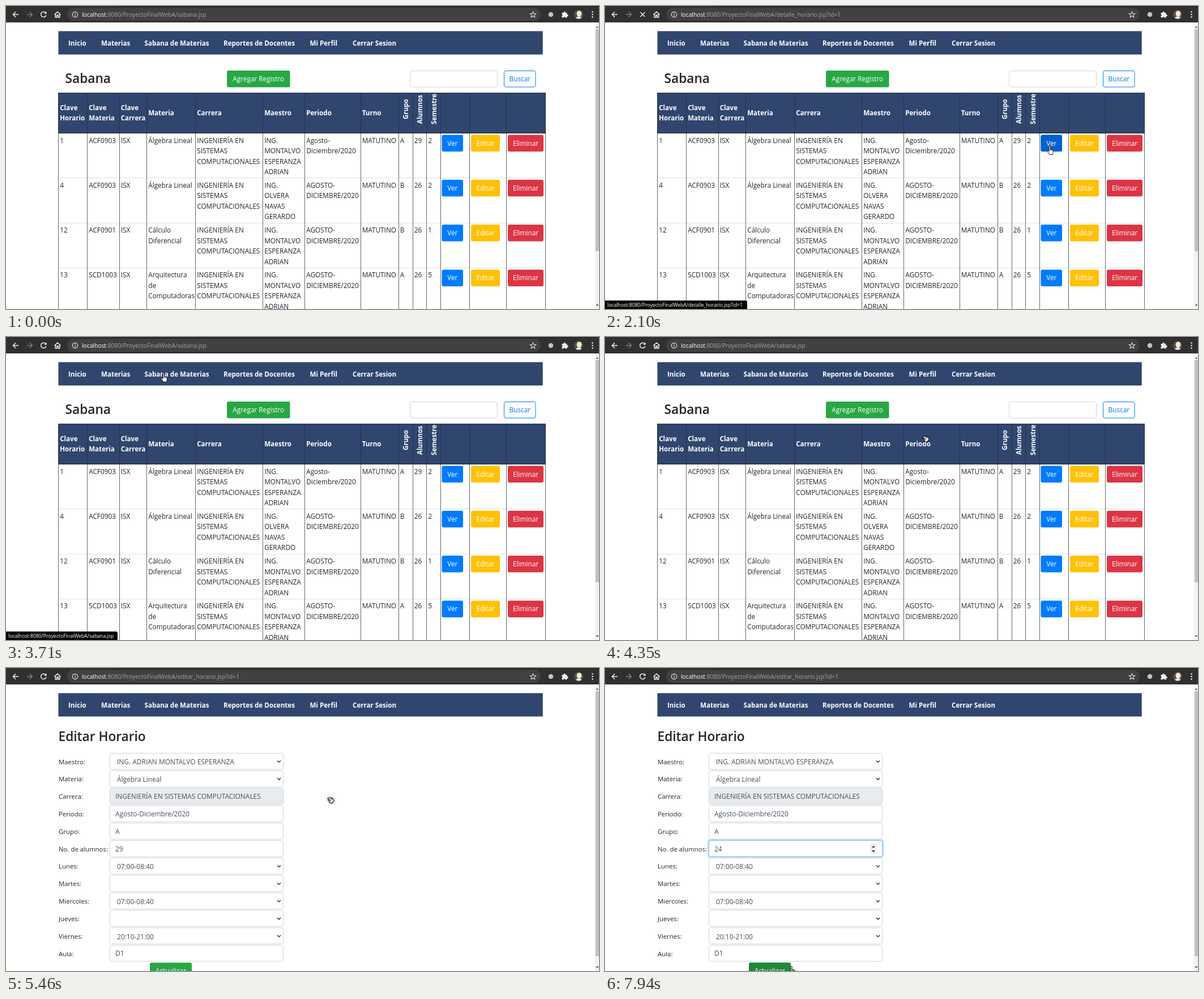
Write an HTML page that moves like this. It is 1047 px wide and 535 px high and loops after 8000 ms.

```html
<!DOCTYPE html>
<html lang="es">
<head>
<meta charset="utf-8">
<title>Sabana</title>
<style>
html, body { margin: 0; width: 100%; height: 100%; overflow: hidden; background: #fff; }
svg { display: block; width: 1047px; height: 535px; }
text { font: 11.8px "Open Sans", "Noto Sans", sans-serif; fill: #212529; white-space: pre; }
.b { font-weight: 700; font-size: 11.6px; }
.w { fill: #fff; }
.mid { text-anchor: middle; }
.h2 { font-size: 22.7px; font-weight: 600; }
.h4 { font-size: 17px; font-weight: 600; }
.label { font-size: 11.4px; }
.value { font-size: 11.95px; }
.field { font-size: 11.95px; fill: #495057; }
.url { font-size: 10.25px; fill: #a3a3a3; }
.url tspan { fill: #fff; }
.tip { font-size: 8.7px; fill: #fff; }
.ico { fill: none; stroke: #f1f1f1; stroke-width: 1.5; }
</style>
</head>
<body>
<script>
const LOOP = 8000;
const pct = t => t / LOOP * 100 + '%';
let css = '', count = 0;

// Show a group only between pairs of times
function on(body, ...times) {
  const k = 'k' + count++;
  const frames = times.map((t, i) => `${pct(t)}{opacity:${1 - i % 2}}`).join('');
  css += `@keyframes ${k}{0%{opacity:0}${frames}}.${k}{animation:${k} ${LOOP}ms step-end infinite}`;
  return `<g class="${k}">${body}</g>`;
}

function travel(body, points) {
  const k = 'k' + count++;
  const frames = points.map(([t, x, y], i) => {
    const next = points[i + 1];
    const n = next ? Math.max(1, Math.round((next[0] - t) / 76)) : 1;
    return `${pct(t)}{transform:translate(${x}px,${y}px);animation-timing-function:steps(${n},end)}`;
  }).join('');
  css += `@keyframes ${k}{${frames}}.${k}{animation:${k} ${LOOP}ms infinite}`;
  return `<g class="${k}">${body}</g>`;
}

const text = (x, y, s, cls = '') => `<text x="${x}" y="${y}" class="${cls}">${s}</text>`;
const rect = (x, y, w, h, fill, extra = '') =>
  `<rect x="${x}" y="${y}" width="${w}" height="${h}" fill="${fill}" ${extra}/>`;
const path = (d, extra = 'class="ico"') => `<path d="${d}" ${extra}/>`;
const vline = (x, y1, y2, c) => path(`M${x} ${y1}V${y2}`, `stroke="${c}"`);
const hline = (y, x1, x2, c) => path(`M${x1} ${y}H${x2}`, `stroke="${c}"`);
const button = (x, y, w, label, fill) =>
  rect(x, y, w, 29.5, fill, 'rx="3"') + text(x + w / 2, y + 19, label, 'w mid');
const box = (x, y, w, fill = '#fff') => rect(x, y, w, 28.5, fill, 'rx="3" stroke="#ced4da"');

function nav(x) {
  const items = [[17.5, 'Inicio'], [75.5, 'Materias'], [152, 'Sabana de Materias'],
    [291.5, 'Reportes de Docentes'], [444, 'Mi Perfil'], [519.5, 'Cerrar Sesion']];
  return rect(x, 44.4, 855.2, 41.2, '#30466f') +
    items.map(([dx, s]) => text(x + dx, 70, s, 'b w')).join('');
}

function scrollbar(end) {
  return rect(1040, 29, 7, 506, '#f1f1f1') + rect(1041, 41, 6, end - 41, '#c1c1c1') +
    path('M1041.5 38.5l2.5-3 2.5 3z', 'fill="#606060"') +
    path('M1041.5 527l2.5 3 2.5-3z', 'fill="#505050"');
}

const TEACHER = ['MONTALVO', 'ESPERANZA', 'ADRIAN'];

function listPage() {
  const cols = [92.5, 143.5, 200, 248.5, 334.5, 453.5, 527.5, 626, 693, 718, 742.5, 767, 818.5, 883.5, 952.5];
  const heads = ['Clave|Horario', 'Clave|Materia', 'Clave|Carrera', 'Materia', 'Carrera', 'Maestro', 'Periodo', 'Turno'];
  const major = 'INGENIERÍA EN|SISTEMAS|COMPUTACIONALES';
  const term = 'AGOSTO-|DICIEMBRE/2020';
  const teacher = 'ING.|' + TEACHER.join('|');
  const rows = [
    ['1', 'ACF0903', 'ISX', 'Álgebra Lineal', major, teacher, 'Agosto-|Diciembre/2020', 'MATUTINO', 'A', '29', '2'],
    ['4', 'ACF0903', 'ISX', 'Álgebra Lineal', major, 'ING.|OLVERA|NAVAS|GERARDO', term, 'MATUTINO', 'B', '26', '2'],
    ['12', 'ACF0901', 'ISX', 'Cálculo|Diferencial', major, teacher, term, 'MATUTINO', 'B', '26', '1'],
    ['13', 'SCD1003', 'ISX', 'Arquitectura|de|Computadoras', major, teacher, term, 'MATUTINO', 'A', '26', '5']
  ];
  const lines = (x, y, s, cls) => s.split('|').map((l, i) => text(x, y + i * 18.5, l, cls)).join('');

  let s = nav(92.5) + text(104.5, 135.5, 'Sabana', 'h2') +
    button(390, 114, 111.5, 'Agregar Registro', '#28a745') +
    box(713.5, 114.5, 154) +
    rect(879.5, 114.5, 55.5, 28.5, '#fff', 'rx="3" stroke="#007bff"') +
    '<text x="907.3" y="133" class="mid" style="fill:#007bff">Buscar</text>' +
    rect(92.5, 153, 860.5, 72, '#30466f');

  heads.forEach((h, i) => s += lines(cols[i] + 2.7, h.includes('|') ? 183.5 : 192.5, h, 'b w'));
  [['Grupo', 709.5, 200], ['Alumnos', 734.5, 208], ['Semestre', 759.5, 209]].forEach(([h, x, y]) =>
    s += `<text transform="translate(${x} ${y}) rotate(-90)" class="b w">${h}</text>`);

  rows.forEach((row, r) => {
    const y = 225 + r * 79.3;
    if (r) s += hline(Math.round(y) - .5, 93, 953, '#dee2e6');
    row.forEach((cell, c) => s += lines(cols[c] + 2.7, y + 16.5, cell));
    s += button(769.5, y + 2.5, 37.5, 'Ver', '#007bff') +
      button(821, y + 2.5, 51, 'Editar', '#ffc107') +
      button(886, y + 2.5, 63, 'Eliminar', '#dc3545');
  });
  cols.forEach(x => {
    const px = Math.floor(x) + .5;
    s += vline(px, 153, 225, '#26334d') + vline(px, 225, 535, '#666');
  });
  return s + hline(153.5, 92, 953, '#26334d') + hline(224.5, 92, 953, '#222') + scrollbar(433) +
    on(button(769.5, 227.5, 37.5, 'Ver', '#0062cc'), 1530, 2170) +
    on(button(821, 227.5, 51, 'Editar', '#d39e00'), 4600, 5230);
}

function detailPage() {
  const rows = [
    ['Clave Materia', 'ACF0903', 'Materia', 'Álgebra Lineal'],
    ['Clave Carrera', 'ISX', 'Carrera', 'INGENIERÍA EN SISTEMAS COMPUTACIONALES'],
    ['Periodo', 'Agosto-Diciembre/2020', 'Turno', 'MATUTINO'],
    ['Grupo', 'A', 'No. Alumnos', '29'],
    ['Semestre', '2', '', '']
  ];
  const days = [
    ['Lunes', 'Martes', 'Miercoles', 'Jueves', 'Viernes'],
    ['07:00-08:40', '', '07:00-08:40', '', '19:20-20:10']
  ];
  const grid = (data, cols, top, isBold, shaded) => {
    let s = '';
    const end = top + data.length * 20.9;
    data.forEach((row, r) => {
      const y = top + r * 20.9;
      if (r % 2 === shaded) s += rect(98.5, y, 855, 20.9, '#f2f2f2');
      if (r) s += hline(Math.floor(y) + .5, 98, 954, '#777');
      row.forEach((c, i) => s += text(cols[i] + 1.5, y + 15.2, c, isBold(r, i) ? 'b' : 'value'));
    });
    cols.slice(1).forEach(x => s += vline(x, top, end, '#777'));
    return s + rect(98.5, Math.floor(top) + .5, 855, Math.round(end - top), 'none', 'stroke="#222"');
  };
  return nav(98.5) + text(98.5, 123, 'Detalles del horario: 1', 'h4') +
    text(98.5, 150.7, 'Docente: ING. ' + TEACHER.join(' '), 'h4') +
    grid(rows, [98.5, 225.5, 431.5, 551.5], 160.6, (r, i) => i % 2 === 0, 0) +
    grid(days, [98.5, 298.5, 428.5, 628.5, 752.5], 265.2, r => r === 0, 1);
}

function editPage() {
  const [first, second, given] = TEACHER;
  const fields = [
    ['Maestro', `ING. ${given} ${first} ${second}`, 1], ['Materia', 'Álgebra Lineal', 1],
    ['Carrera', 'INGENIERÍA EN SISTEMAS COMPUTACIONALES', 0], ['Periodo', 'Agosto-Diciembre/2020', 0],
    ['Grupo', 'A', 0], ['No. de alumnos', '', 0], ['Lunes', '07:00-08:40', 1], ['Martes', '', 1],
    ['Miercoles', '07:00-08:40', 1], ['Jueves', '', 1], ['Viernes', '20:10-21:00', 1], ['Aula', 'D1', 0]
  ];
  let s = nav(92.5) + text(92.5, 129, 'Editar Horario', 'h2');
  fields.forEach(([label, value, select], i) => {
    const y = 150.5 + i * 30.82;
    s += text(93, y + 19, label + ':', 'label') + box(183.5, y, 306, i === 2 ? '#e9ecef' : '#fff') +
      text(select ? 196 : 193, y + (select ? 19.8 : 18.8), value, 'field');
    if (select) s += path(`M479 ${y + 13}l3 3 3-3`, 'fill="none" stroke="#343a40" stroke-width="1.5"');
  });

  const ring = opacity => `<g opacity="${opacity}">` +
    rect(182, 303.1, 309, 31.5, 'none', 'rx="4" stroke="#bfdeff" stroke-width="2.5"') +
    rect(183.5, 304.6, 306, 28.5, 'none', 'rx="3" stroke="#80bdff"') + '</g>';
  s += on(ring(.5), 6560, 6640) + on(ring(1), 6640, LOOP);

  const changes = [0, 6560, 6940, 7090, 7240, 7390, LOOP];
  for (let i = 0; i < 6; i++) s += on(text(193, 323.6, 29 - i, 'field'), changes[i], changes[i + 1]);
  s += on(vline(207.5, 312, 327, '#495057'), 6640, 7860);
  s += on(rect(468, 310, 12, 18, '#efefef') +
    path('M471 317l3-3.5 3 3.5zM471 322l3 3.5 3-3.5z', 'fill="#444"'), 6240, LOOP);

  return s + button(254, 520.3, 74, 'Actualizar', '#28a745') +
    on(button(254, 520.3, 74, 'Actualizar', '#218838'), 7860, LOOP) + scrollbar(509);
}

const ROOT = 'localhost:8080/ProyectoFinalWebA/';

function chrome() {
  const url = page => `<text x="134" y="18.6" class="url"><tspan>localhost</tspan>:8080/ProyectoFinalWebA/${page}</text>`;
  const reload = path('M70.3 12.2a4.7 4.7 0 1 0 .6 4') + path('M71.6 9.5v4.3h-4.3z', 'fill="#f1f1f1"');
  const stop = path('M62.5 11l8 8m0-8l-8 8');
  const dots = [10.5, 15, 19.5].map(y => `<circle cx="1035.5" cy="${y}" r="1.3" fill="#f1f1f1"/>`).join('');
  return rect(0, 0, 1047, 29, '#303030') + rect(195, 0, 852, 1, '#1c1c1c') +
    rect(108, 3.5, 836, 22.5, '#414141', 'rx="11.2"') +
    path('M22 15H12.5m4.7-4.7L12.5 15l4.7 4.7') +
    path('M37 15h9.5m-4.7-4.7l4.7 4.7-4.7 4.7', 'fill="none" stroke="#7c7c7c" stroke-width="1.5"') +
    on(reload, 0, 1900, 2170, 3470, 3710, 4830, 5230, LOOP) +
    on(stop, 1900, 2170, 3470, 3710, 4830, 5230) +
    path('M85.5 15.2l5.5-5 5.5 5M87.3 14v6h2.6v-4h2.2v4h2.6v-6') +
    '<circle cx="122" cy="15" r="4.7" fill="none" stroke="#e0e0e0" stroke-width="1.2"/>' +
    path('M122 14.3v3.2M122 12v1.3', 'stroke="#e0e0e0" stroke-width="1.3"') +
    on(url('sabana.jsp'), 0, 2010, 3550, 5230) +
    on(url('detalle_horario.jsp?id=1'), 2010, 3550) +
    on(url('editar_horario.jsp?id=1'), 5230, LOOP) +
    path('M930.5 10l1.5 3.4 3.6.3-2.8 2.4.9 3.6-3.2-2-3.2 2 .9-3.6-2.8-2.4 3.6-.3z',
      'fill="none" stroke="#dcdcdc" stroke-width="1.1"') +
    '<circle cx="962" cy="15" r="4.3" fill="#c4c4c4"/>' +
    path('M981.5 12h3a1.7 1.7 0 1 1 3.2 0h2.8v3a1.7 1.7 0 1 1 0 3.2v2.3h-3a1.5 1.5 0 0 0-3 0h-3v-3a1.6 1.6 0 0 0 0-3z', 'fill="#f1f1f1"') +
    '<circle cx="1011" cy="15" r="8" fill="#5a5040"/><ellipse cx="1012" cy="13.5" rx="4.4" ry="5.2" fill="#f1e9d6"/>' +
    path('M1005.5 20.8q6.5-5 11 0-5 4-11 0z', 'fill="#e4edf0"') + dots;
}

const tip = (page, w) => path(`M0 520h${w - 3}q3 0 3 3v12H0z`, 'fill="#050505"') + text(4, 530.7, ROOT + page, 'tip');

const hand = path('M4 1.4c0-1.5 2.3-1.5 2.3 0v5l4 .9c1.1.3 1.5 1 1.4 2l-.6 4.2c-.1.8-.6 1.4-.9 2.8H4.9L1.2 11c-.8-1.1.5-2.2 1.5-1.3L4 10.9zM6.3 6.4v3M8.4 7v2.6M10.3 7.4v2.3',
  'fill="#fff" stroke="#111"');
const pointer = path('M1 3.2l2.6-1 3.2 1.2 1.4-1.2 3.3 4.6-3.6 4.7-4.2-1.8.5-1.7L1.6 6l1.8-.6zM3.4 5.4l3 1.6M6.8 3.4l1.4 2',
  'fill="#fff" stroke="#111" stroke-width="1.1" transform="translate(-.5 -.7) scale(1.12)"');

const cursor = travel(
  on(hand, 1530, 2330, 3160, 3890, 4600, 4830, 7860, LOOP) +
  on(pointer, 460, 1530, 2330, 3160, 3890, 4600, 4830, 7860),
  [[0, 1060, 560], [459, 1060, 560], [460, 1035, 531], [530, 1022, 529], [690, 1022, 529],
   [840, 985, 455], [1070, 880, 340], [1300, 812, 277], [1450, 794, 261], [1530, 780, 246],
   [2330, 780, 246], [2480, 765, 238], [2710, 640, 200], [2870, 490, 155], [3020, 362, 116],
   [3100, 366, 92], [3160, 262, 56], [3250, 273, 63], [3890, 273, 63], [4040, 300, 90],
   [4260, 480, 150], [4450, 720, 220], [4670, 850, 239], [5300, 850, 239], [5380, 725, 234],
   [5460, 567, 227], [5540, 470, 222], [5620, 416, 220], [5680, 416, 220], [5900, 432, 245],
   [6160, 460, 295], [6390, 470, 318], [7480, 470, 318], [7630, 370, 440], [7710, 322, 484],
   [7790, 322, 484], [7860, 326, 520], [7940, 324, 526], [8000, 324, 526]]);

const scene = '<svg viewBox="0 0 1047 535">' +
  on(listPage(), 0, 2170, 3630, 5230) +
  on(detailPage(), 2170, 3630) +
  on(editPage(), 5230, LOOP) +
  chrome() +
  on(tip('detalle_horario.jsp?id=1', 251), 1610, 2400) +
  on(tip('sabana.jsp', 197), 3410, 4040) +
  on(tip('editar_horario.jsp?id=1', 247), 4600, 5380) +
  cursor + '</svg>';

document.head.insertAdjacentHTML('beforeend', `<style>${css}</style>`);
document.body.insertAdjacentHTML('beforeend', scene);
</script>
</body>
</html>
```
